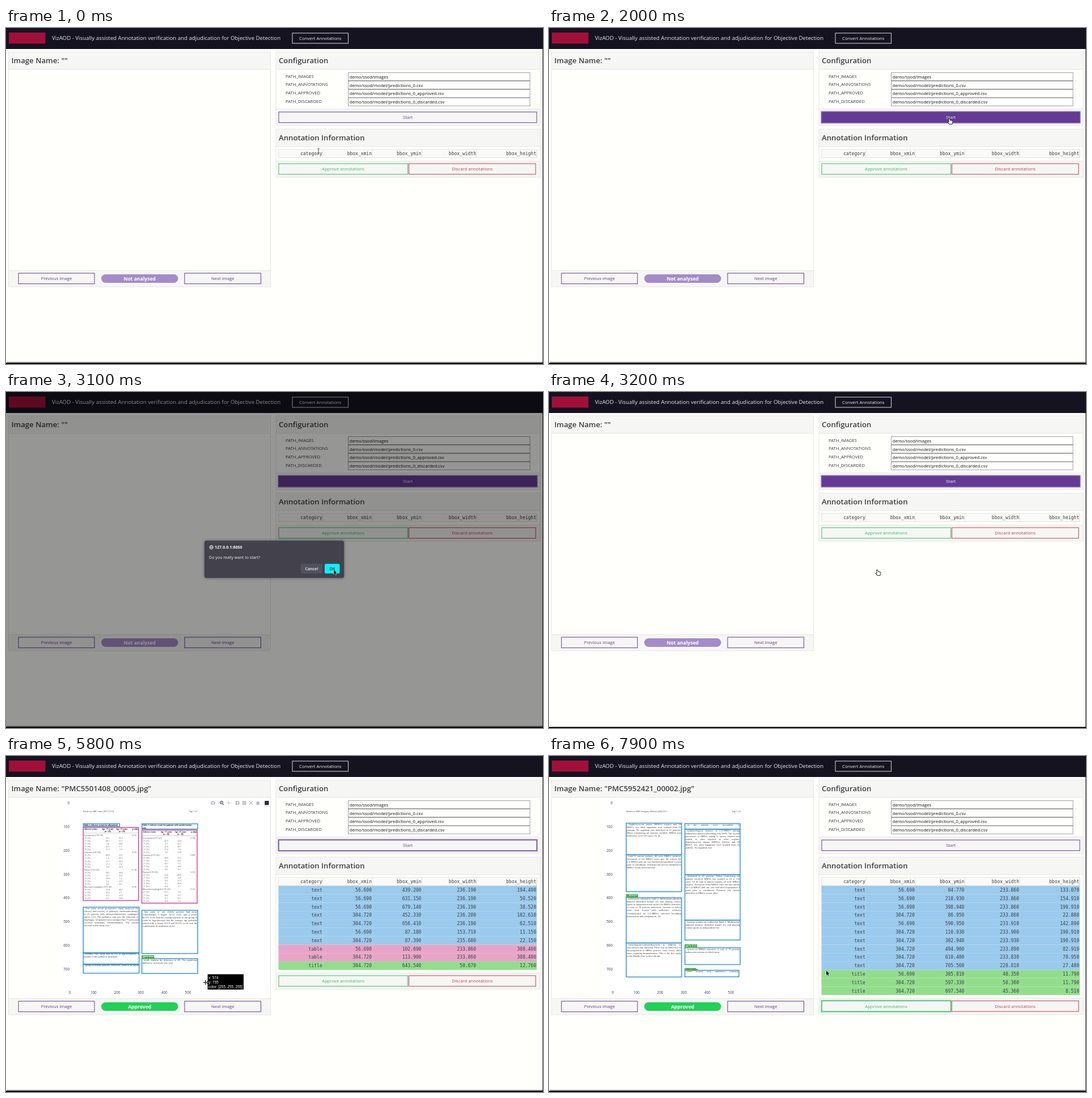
An HTML page with a canvas that plays this animation: 947 by 592 pixels, repeating every 8000 ms.

```html
<!DOCTYPE html>
<html lang="en">
<head>
<meta charset="utf-8">
<title>VizAOD</title>
<style>
html, body { margin: 0; width: 100%; height: 100%; overflow: hidden; background: #fffffc; }
canvas { display: block; width: 947px; height: 592px; }
</style>
</head>
<body>
<canvas id="stage"></canvas>
<script>
const W = 947, H = 592, LOOP = 8000, STEP = 100;
const canvas = document.getElementById('stage');
const ctx = canvas.getContext('2d');
const ratio = window.devicePixelRatio || 1;
canvas.width = W * ratio;
canvas.height = H * ratio;

const SANS = '"Open Sans", "Noto Sans", sans-serif';
const MONO = '"DejaVu Sans Mono", monospace';
const SERIF = '"Liberation Serif", "Noto Serif", serif';
const ARIAL = '"Liberation Sans", sans-serif';
const BG = '#fffffc', PANEL = '#f6f7f4', LINE = '#e1e2df', INK = '#3d3d40';
const PURPLE = '#643a96', GREEN = '#36bd68', RED = '#cb3a50';
const ROW = { text: '#9acaed', table: '#e8a4c8', title: '#92dd8c' };
const FRAME = { text: '#3796da', table: '#d14a9b', title: '#2fae24' };

// kind, then xmin, ymin, width, height
const PAGES = [
  {
    name: 'PMC5501408_00005.jpg',
    head: 'Norvik et al. BMC Cancer (2017) 17:214', foot: 'Page 5 of 7',
    rows: [
      ['text', 56.69, 439.2, 236.19, 194.49], ['text', 56.69, 631.15, 236.19, 50.52],
      ['text', 56.69, 679.14, 236.19, 38.52], ['text', 304.72, 452.33, 236.2, 182.61],
      ['text', 304.72, 656.41, 236.19, 62.51], ['text', 56.69, 87.18, 153.71, 11.15],
      ['text', 304.72, 87.39, 235.68, 22.15], ['table', 56.69, 102.69, 233.86, 308.4],
      ['table', 304.72, 113.9, 233.86, 308.4], ['title', 304.72, 643.54, 50.67, 12.76]
    ],
    captions: ['Table 2 Adverse events for all patients',
      'Table 3 Adverse events for patients with curative intent only'],
    titles: ['Conclusion'],
    prose: 'One early recent prospective study analysed the efficacy and toxicity of palliative chemoradiotherapy in 21 patients with advanced/metastatic esophageal cancer [15]. The palliative aim was the reduction of dysphagia. All patients were younger than 75 years and received systematic chemoradiation. The overall survival in this study was 7 months. One study had an OS of approximately 3 months in the palliative treatment group of elderly patients. However, it has to be noted that some of our elderly patients had more comorbidities, a higher ACCI score, and a worse ECOG score than the younger patients in our group. It could be hypothesised that the younger age probably paired with a lower ACCI and ECOG score and the combination of treatments in the study explains the difference in OS. The significant difference in toxicity was seen between younger patients and older patients, neither for the whole group nor for the elderly patients treated in curative intent. Younger patients were more often staged with CT and/or PET/CT than elderly patients, which might cause a bias. However, in absolute numbers, CT staging was only missing in three elderly patients treated with curative intent and one elderly patient with palliative treatment.'
  },
  {
    name: 'PMC5952421_00002.jpg',
    head: 'Waldek et al. BMC Emergency Medicine (2018) 18:13', foot: 'Page 2 of 6',
    rows: [
      ['text', 56.69, 84.77, 233.86, 133.07], ['text', 56.69, 218.93, 233.86, 154.91],
      ['text', 56.69, 398.94, 233.86, 190.91], ['text', 304.72, 86.95, 233.86, 22.88],
      ['text', 56.69, 590.95, 233.91, 142.89], ['text', 304.72, 110.93, 233.9, 190.91],
      ['text', 304.72, 302.94, 233.93, 190.91], ['text', 304.72, 494.9, 233.89, 82.91],
      ['text', 304.72, 610.4, 233.83, 70.95], ['text', 304.72, 705.56, 228.81, 27.48],
      ['title', 56.69, 385.81, 48.35, 11.79], ['title', 304.72, 597.33, 50.36, 11.79],
      ['title', 304.72, 697.54, 45.36, 8.51]
    ],
    captions: [],
    titles: ['Discussion', 'Conclusion', 'Abbreviations'],
    prose: 'Staphylococcus aureus (MSSA) isolates and 18 MSSA, two other organisms were isolated from 16 patients. No organism was identified in 22 patients. When considering all patients enrolled, MRSA was isolated in 14 of 156 cases. Of 36 total S. aureus isolates, 18 were MRSA positive. Seventeen of the MRSA cases met the criteria for CA-MRSA and one case had been hospitalized 3 years prior to enrollment. Potential risk factors identified in MRSA versus other bacteria isolates are outlined in Table 2. Multivariate adjusted analysis identified female sex and playing contact sports as independent risk factors for MRSA infection. A total of 78 patients underwent incision of which most were treated with antibiotics routinely recommended for CA-MRSA infection including doxycycline and clindamycin. All of the isolates were susceptible to trimethoprim-sulfamethoxazole in addition to vancomycin and linezolid. There was no difference in the proportion of MRSA positive cases versus other cases requiring hospitalization. This is the first study in the Middle East to describe the epidemiological features of CA-MRSA among ambulatory patients presenting with SSTI. The overall prevalence of MRSA among S. aureus isolates was similar to rates reported in other regions.'
  }
];

const rect = (x, y, w, h, fill) => { ctx.fillStyle = fill; ctx.fillRect(x, y, w, h); };
const frame = (x, y, w, h, color, lw = 1) => {
  ctx.strokeStyle = color; ctx.lineWidth = lw; ctx.strokeRect(x, y, w, h);
};
const ramp = (t, a, b) => Math.min(1, Math.max(0, (t - a) / (b - a)));

function text(s, x, yc, size, color = INK, { align = 'left', weight = 400, font = SANS } = {}) {
  ctx.font = `${weight} ${size}px ${font}`;
  ctx.textAlign = align;
  ctx.fillStyle = color;
  ctx.fillText(s, x, yc + size * 0.36);
}

function round(x, y, w, h, r, fill) {
  ctx.beginPath(); ctx.roundRect(x, y, w, h, r);
  ctx.fillStyle = fill; ctx.fill();
}

function poly(points, fill, stroke, lw = 0.8) {
  ctx.beginPath();
  points.forEach(([x, y]) => ctx.lineTo(x, y));
  ctx.closePath();
  if (stroke) { ctx.strokeStyle = stroke; ctx.lineWidth = lw; ctx.stroke(); }
  ctx.fillStyle = fill; ctx.fill();
}

function card(y, h, title, footH, x = 476, w = 466) {
  rect(x, y, w, 31, PANEL);
  rect(x, y + h - footH, w, footH, PANEL);
  rect(x, y + 30.5, w, 0.8, LINE);
  rect(x, y + h - footH, w, 0.8, LINE);
  frame(x, y, w, h, LINE, 0.8);
  text(title, x + 5, y + 15, 13.2, INK, { weight: 600 });
}

function button(label, x, y, w, h, color, fill = 0, ring = '') {
  if (ring) frame(x - 0.5, y - 0.5, w + 1, h + 1, ring, 2.6);
  if (fill) { ctx.globalAlpha = fill; rect(x, y, w, h, color); ctx.globalAlpha = 1; }
  frame(x, y, w, h, color, 1);
  text(label, x + w / 2, y + h / 2, 7.7, fill > 0.5 ? '#f1eef5' : color, { align: 'center' });
}

const px = x => 112.6 + x * 0.4168;
const py = y => 83 + y * 0.4175;

function paragraph(words, start, x, y, w, h) {
  const count = Math.max(1, Math.round(h / 12));
  ctx.font = `4.4px ${SERIF}`;
  ctx.textAlign = 'left';
  ctx.fillStyle = '#3a3a3a';
  let i = start;
  for (let n = 0; n < count; n++) {
    const left = x + (n ? 1 : 4), last = n === count - 1 && n > 0;
    const room = (x + w - 1 - left) * (last ? 0.62 : 1);
    const line = [];
    let used = 0;
    for (;;) {
      const word = words[i % words.length], ww = ctx.measureText(word).width;
      if (used + ww + line.length * 0.9 > room) break;
      line.push([word, ww]); used += ww; i++;
    }
    const gap = last ? 1.1 : (room - used) / Math.max(1, line.length - 1);
    let at = left;
    for (const [word, ww] of line) {
      ctx.fillText(word, at, y + 3.9 + n * 5.01);
      at += ww + gap;
    }
  }
  return i;
}

function dataTable(x, y, seed) {
  const opt = { font: SERIF, weight: 700 }, mid = { font: SERIF, align: 'center' };
  const heads = ['Age <75 years', 'Age ≥75 years'], counts = ['(n = 49)', '(n = 20)'];
  const groups = ['Leucopenia (CTCAE)', 'Anaemia (CTCAE)', 'Nausea (CTCAE)', 'Mucositis/esophagitis (CTCAE)'];
  text('Adverse events', x + 1.5, y + 3, 3.6, '#111', opt);
  heads.forEach((s, k) => {
    text(s, x + 43 + k * 25, y + 3, 3.4, '#111', { ...opt, align: 'center' });
    text(counts[k], x + 43 + k * 25, y + 7, 3.4, '#111', { ...opt, align: 'center' });
  });
  text('p value', x + 97, y + 3, 3.4, '#111', { ...opt, align: 'right' });
  rect(x + 1, y + 9.8, 96, 0.4, '#888');
  for (let r = 0; r < 23; r++) {
    const g = Math.floor(r / 6), k = r % 6, yy = y + 14 + r * 5.03;
    if (!k) {
      text(groups[g], x + 1.5, yy, 3.8, '#555', { font: SERIF });
      text('0.' + (100 + (g * 271 + seed * 337 + 152) % 880), x + 94, yy, 3.6, '#555', { ...mid, align: 'right' });
    } else {
      text(`${k - 1}° (%)`, x + 3, yy, 3.8, '#555', { font: SERIF });
      for (let c = 0; c < 2; c++) {
        const v = (((r * 37 + c * 53 + seed * 29) % 97) / (k + 0.6)).toFixed(1);
        text(v, x + 43 + c * 23, yy, 3.8, '#555', mid);
      }
    }
  }
}

function plot(page) {
  rect(98, 78, 368, 345, '#fff');
  for (let i = 0; i < 8; i++) text(i * 100, 112, py(i * 100), 6.3, '#2a3f5f', { align: 'right' });
  for (let i = 0; i < 6; i++) text(i * 100, px(i * 100), 417, 6.3, '#2a3f5f', { align: 'center' });
  text(page.head, 136, 98, 3.3, '#444', { font: SERIF });
  text(page.foot, 338, 98, 3.3, '#444', { font: SERIF, align: 'right' });
  const words = page.prose.split(' ');
  let at = 0, caption = 0, title = 0, table = 0;
  for (const [kind, x0, y0, w0, h0] of page.rows) {
    const x = px(x0), y = py(y0), w = w0 * 0.4168, h = h0 * 0.4175;
    if (kind === 'table') dataTable(x, y, table++);
    else if (kind === 'title') {
      rect(x, y, w, h, '#b8efb0');
      text(page.titles[title++], x + 1, y + h / 2, Math.min(4.2, h), '#123c10', { font: SERIF, weight: 700 });
    } else if (page.captions.length && h0 < 25) {
      const s = page.captions[caption++], cut = h0 > 15 ? s.lastIndexOf(' ') : s.length;
      const o = { font: SERIF, weight: 700 };
      text(s.slice(0, cut), x + 1, y + 2.5, 3.7, '#111', o);
      text(s.slice(cut + 1), x + 1, y + 7, 3.7, '#111', o);
    } else at = paragraph(words, at, x, y, w, h);
    frame(x, y, w, h, FRAME[kind], kind === 'title' ? 1.2 : 1.5);
  }
}

function modebar(alpha) {
  ctx.save();
  ctx.globalAlpha = alpha;
  const c = '#b9bcc2';
  rect(361.3, 80.4, 7.4, 5.2, c); rect(363.5, 79.3, 3, 2, c);
  ctx.fillStyle = '#fff'; ctx.beginPath(); ctx.arc(365, 83, 1.5, 0, 7); ctx.fill();
  ctx.strokeStyle = '#777b84'; ctx.lineWidth = 1.3;
  ctx.beginPath(); ctx.arc(380, 82, 2.5, 0, 7); ctx.moveTo(382, 84); ctx.lineTo(384.3, 86.3); ctx.stroke();
  rect(378.6, 81.6, 2.8, 0.8, '#777b84'); rect(379.6, 80.6, 0.8, 2.8, '#777b84');
  rect(389, 82.1, 7.4, 0.9, c); rect(392.3, 78.8, 0.9, 7.4, c);
  for (const x of [405, 417]) { rect(x, 79.3, 6.6, 6.6, c); rect(x + 1.3, 82.1, 4, 1, '#fff'); }
  rect(407.8, 80.6, 1, 4, '#fff');
  ctx.strokeStyle = c; ctx.lineWidth = 1.1;
  ctx.beginPath();
  ctx.moveTo(429, 79.5); ctx.lineTo(435, 85.7); ctx.moveTo(435, 79.5); ctx.lineTo(429, 85.7);
  ctx.stroke();
  poly([[440.3, 82.8], [444.2, 79.2], [448, 82.8], [446.8, 82.8], [446.8, 86], [441.6, 86], [441.6, 82.8]], c);
  rect(456.2, 79, 7.4, 7.4, '#2c2f3a');
  ctx.restore();
}

function infoTable(rows) {
  const edges = [480.5, 558.7, 646, 733.4, 830, 936], h = 14.8;
  const heads = ['category', 'bbox_xmin', 'bbox_ymin', 'bbox_width', 'bbox_height'];
  const mono = { font: MONO, align: 'right' };
  rect(480.5, 214, 455.5, 14.6, '#fafaf8');
  frame(480.5, 214, 455.5, 14.6, '#d8d8d6', 0.7);
  heads.forEach((s, c) => {
    text(s, edges[c + 1] - 1, 221.3, 8, '#3c3c3c', mono);
    rect(edges[c + 1] - 0.3, 214, 0.6, 14.6, '#d3d3d3');
  });
  rows.forEach((row, r) => {
    const y = 228.7 + r * h;
    rect(480.5, y, 455.5, h + 0.1, ROW[row[0]]);
    rect(480.5, y, 455.5, 0.5, 'rgba(225,225,225,.45)');
    row.forEach((v, c) => {
      rect(edges[c + 1] - 0.3, y, 0.6, h, 'rgba(215,215,215,.6)');
      text(c ? v.toFixed(3) : v, edges[c + 1] - 1, y + 7.4, 8, '#3b4148', mono);
    });
  });
}

function dialog() {
  rect(0, 0, W, H, 'rgba(0,0,0,.41)');
  ctx.save();
  ctx.shadowColor = 'rgba(0,0,0,.45)'; ctx.shadowBlur = 5;
  round(350, 262, 246, 65.5, 3.5, '#42414c');
  ctx.restore();
  ctx.strokeStyle = '#f4f4f6'; ctx.lineWidth = 0.7;
  ctx.beginPath(); ctx.arc(362.2, 273.6, 3.3, 0, 7); ctx.stroke();
  ctx.beginPath(); ctx.ellipse(362.2, 273.6, 1.5, 3.3, 0, 0, 7);
  ctx.moveTo(359, 273.6); ctx.lineTo(365.5, 273.6); ctx.stroke();
  text('127.0.0.1:8050', 368, 273.6, 7.1, '#f8f8fa', { weight: 700 });
  text('Do you really want to start?', 358, 291, 7.1, '#f2f2f5');
  round(519.5, 302.8, 38.5, 17, 2, '#52515e');
  round(562, 302.8, 26.5, 17, 2, '#0eeefa');
  text('Cancel', 538.8, 311, 7.1, '#fafafc', { align: 'center', weight: 600 });
  text('OK', 575.2, 311, 7.1, '#2a2a36', { align: 'center', weight: 600 });
}

// time, x, y, shape
const PATH = [
  [0, 551, 217, 'beam'], [100, 552, 214, 'beam'], [300, 556, 196, 'arrow'], [500, 562, 174, 'arrow'],
  [600, 566, 164, 'hand'], [700, 568, 158, 'hand'], [1200, 568, 158, 'hand'], [1300, 588, 172, 'arrow'],
  [1400, 613.5, 183, 'arrow'], [1700, 672, 166, 'hand'], [2000, 706, 160, 'hand'], [2200, 706, 160, 'hand'],
  [2300, 707.5, 173.8, 'arrow'], [2700, 644, 246, 'arrow'], [3100, 578, 313, 'arrow'],
  [3200, 579, 313.8, 'hand'], [3400, 579, 313.8, 'arrow'], [3500, 579, 313.8, 'arrow'],
  [4000, 386.3, 264, 'arrow'], [4200, 386, 264.6, 'arrow'], [4500, 386, 264.6, 'arrow'],
  [4900, 421, 115, 'arrow'], [5400, 358, 361.5, 'arrow'], [5500, 358, 361.5, 'arrow'],
  [5600, 354, 380, 'cross'], [5800, 351.8, 399, 'cross'], [5900, 351.8, 399, 'cross'],
  [6000, 366, 400, 'arrow'], [6200, 452, 399, 'arrow'], [6400, 545, 394, 'hand'],
  [7000, 545, 394, 'arrow'], [7300, 545, 394, 'arrow'], [7900, 489, 378, 'arrow']
];

function pointer(t) {
  let i = PATH.length - 1;
  while (PATH[i][0] > t) i--;
  const a = PATH[i], b = PATH[i + 1] || a, k = b === a ? 0 : (t - a[0]) / (b[0] - a[0]);
  return { x: a[1] + (b[1] - a[1]) * k, y: a[2] + (b[2] - a[2]) * k, shape: a[3] };
}

function drawPointer({ x, y, shape }) {
  ctx.save();
  ctx.translate(x, y);
  if (shape === 'arrow') {
    poly([[0, 0], [0, 8], [1.8, 6.5], [3, 9.3], [4.4, 8.7], [3.2, 6], [5.6, 5.8]], '#111', '#fff', 1);
  } else if (shape === 'hand') {
    poly([[-1, 0.4], [0.3, 0.2], [1, 3.1], [4.4, 3.6], [5.5, 4.6], [5.2, 7.6], [4.3, 9],
      [0.2, 9], [-2.3, 5.8], [-1.5, 5.2], [-0.2, 6]], '#fff', '#222', 1.8);
  } else if (shape === 'beam') {
    rect(-0.5, -4.6, 1, 9.4, '#444');
    rect(-2, -5.3, 4, 0.8, '#555'); rect(-2, 4.6, 4, 0.8, '#555');
  } else {
    rect(-4.4, -1, 8.8, 2, '#fff'); rect(-1, -4.4, 2, 8.8, '#fff');
    rect(-4, -0.6, 8, 1.3, '#222'); rect(-0.6, -4, 1.3, 8, '#222');
  }
  ctx.restore();
}

function tooltip({ x, y }) {
  poly([[x + 1, y], [x + 4, y - 3], [x + 4, y + 3]], '#000');
  rect(x + 3.8, y - 14.5, 63.4, 27, '#000');
  const lines = ['x: ' + Math.round((x - 112.6) / 0.4168), 'y: ' + Math.round((y - 83 - 0.8) / 0.4175),
    'color: [255, 255, 255]'];
  lines.forEach((s, i) => text(s, x + 5.3, y - 8.8 + i * 8.1, 6.4, '#fff', { font: ARIAL }));
}

function draw(t) {
  const info = t < 3400 ? null : PAGES[t < 7000 ? 0 : 1];
  const chart = t < 3600 ? null : PAGES[t < 7100 ? 0 : 1];
  const startFill = ramp(t, 500, 700) - ramp(t, 1200, 1400) + ramp(t, 1600, 1800) - ramp(t, 3200, 3400);
  const startRing = t >= 2000 && t < 6800;
  const approveFill = t >= 6400 && t < 7000 ? ramp(t, 6300, 6500) : 0;
  const cursor = pointer(t);

  ctx.setTransform(ratio, 0, 0, ratio, 0, 0);
  rect(0, 0, W, H, BG);
  rect(0, 0, W, 37, '#15131f');
  rect(5, 8, 64.5, 19.5, '#a30f3b');
  text('VizAOD - Visually assisted Annotation verification and adjudication for Objective Detection',
    81, 18, 9.67, '#e9e9ec');
  frame(505, 9, 98.5, 18, '#dcdce0', 1);
  text('Convert Annotations', 554.3, 18, 7.75, '#f0f0f2', { align: 'center' });

  card(42, 414, `Image Name: "${info ? info.name : ''}"`, 29, 4.5, 462);
  if (chart) {
    plot(chart);
    const bar = 1 - ramp(t, 6000, 6300);
    if (bar) modebar(bar);
  }
  button('Previous image', 22, 432, 134, 18.7, PURPLE);
  round(168, 434, 135.5, 15, 7.5, chart ? '#20d158' : '#a48bc9');
  text(chart ? 'Approved' : 'Not analysed', 235.7, 441.6, 8.6, '#fff', { align: 'center', weight: 700 });
  button('Next image', 315, 432, 134.5, 18.7, PURPLE);

  card(42, 130, 'Configuration', 29.5);
  const fields = [['IMAGES', 'images'], ['ANNOTATIONS', 'model/predictions_0.csv'],
    ['APPROVED', 'model/predictions_0_approved.csv'], ['DISCARDED', 'model/predictions_0_discarded.csv']];
  fields.forEach(([key, path], i) => {
    text('PATH_' + key, 493, 84.8 + i * 14.7, 7.7);
    frame(603.5, 78.7 + i * 14.8, 320.5, 14, '#85858c', 0.8);
    text('demo/ssod/' + path, 605.7, 86 + i * 14.8, 7.66, '#111');
  });
  button('Start', 481, 148, 455, 18.7, PURPLE, startFill, startRing ? '#b3a0d2' : '');

  const rows = info ? info.rows : [], shift = rows.length * 14.8;
  card(178, 85 + shift, 'Annotation Information', 29);
  infoTable(rows);
  button('Discard annotations', 710.5, 239 + shift, 223.5, 18.7, RED);
  button('Approve annotations', 481, 239 + shift, 227.5, 18.7, GREEN, approveFill, t >= 6800 ? '#8fe0ad' : '');

  rect(946, 37, 1, H - 37, '#3a3a3e');
  if (t < 3200 || t >= 3600) rect(1, 588.3, W - 2, 1.7, '#8d8d8d');
  rect(0, 590, W, 2, '#0c0c0e');

  if (t >= 2300 && t < 3200) dialog();
  if (t >= 5700 && t < 6000) tooltip(cursor);
  drawPointer(cursor);
}

let shown = -1;
const begin = performance.now();
function tick() {
  const t = Math.floor(((performance.now() - begin) % LOOP) / STEP) * STEP;
  if (t !== shown) { shown = t; draw(t); }
  requestAnimationFrame(tick);
}
tick();
</script>
</body>
</html>
```
